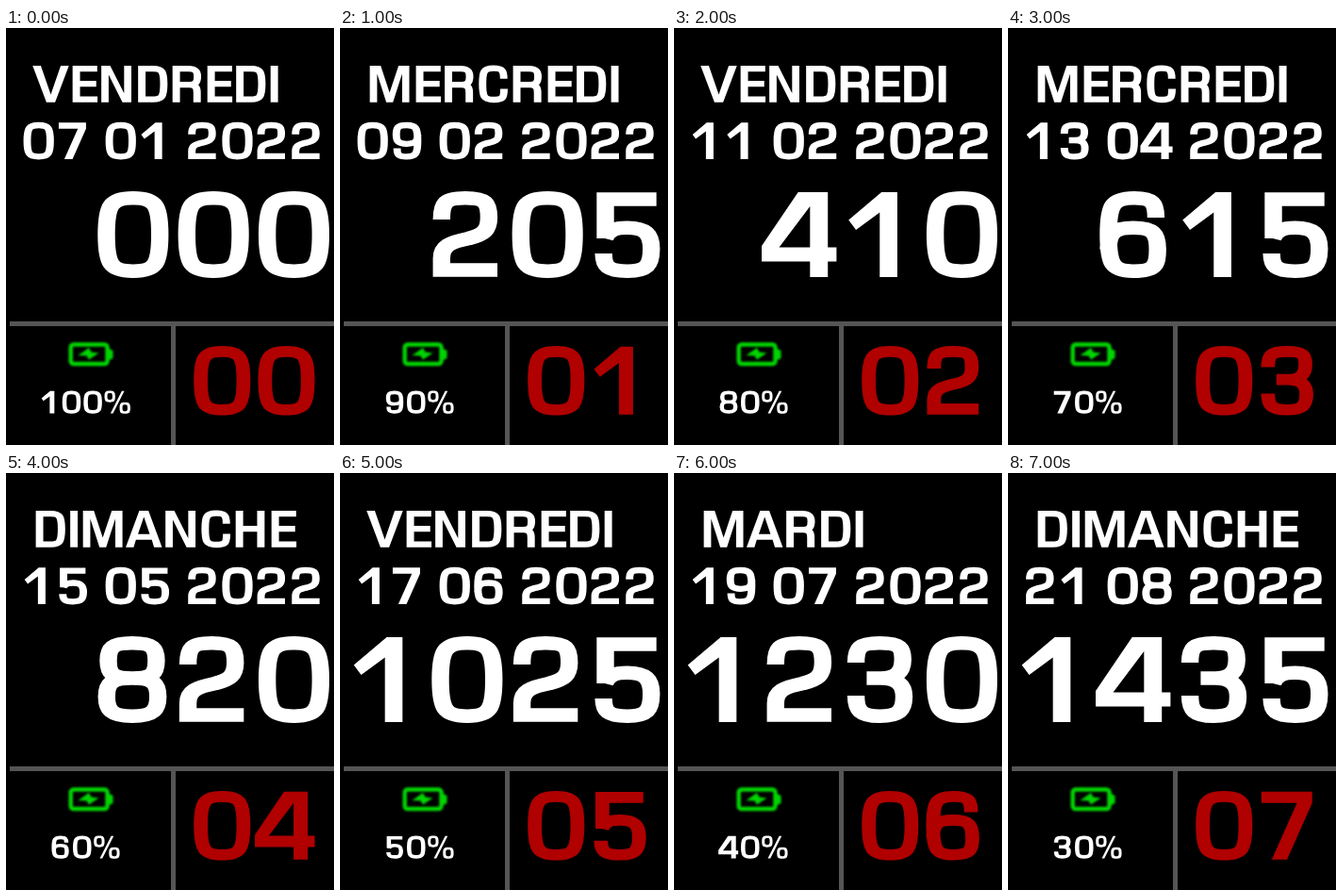
Write an HTML page that moves like this. It is 348 by 442 pixels and loops after 8000 ms.

```html
<!DOCTYPE html>
<html lang="fr">
<head>
<meta charset="utf-8">
<title>Compteur</title>
<style>
  html, body { margin: 0; width: 100%; height: 100%; overflow: hidden; background: #000; }
  svg { display: block; width: 348px; height: 442px; }
</style>
</head>
<body>
<svg viewBox="0 0 348 442">
  <rect width="348" height="442"/>
  <path d="M4 313.5H348M177.5 313V442" stroke="#555" stroke-width="5"/>
  <g style="filter:blur(.8px)" fill="#00d400">
    <rect x="68.7" y="335.5" width="38.8" height="20.5" rx="3" fill="none" stroke="#00d400" stroke-width="4.4"/>
    <path d="M108.5 339.5l5 2.5v8l-5 2.5z"/>
    <path d="M76.5 347L88 339 90.5 343.5 98.5 344.5 88 351.5 85.5 347.5Z"/>
  </g>
  <g id="labels"></g>
</svg>
<script>
const SVG = 'http://www.w3.org/2000/svg';
const STEP = 1000, STEPS = 8;
const WIDE = 1.26; // widens glyphs so upright stems are heavier than bars
const DIGIT = 67.7;
const ring = 'c-13 0-17 4-17 23s4 23 17 23 17-4 17-23-4-23-17-23zm0 10c-7 0-8 2-8 13s1 13 8 13 8-2 8-13-1-13-8-13z';

// Square display face: [advance, stroked path, filled path], cap height 90
const glyphs = {
  0: [DIGIT, 'M12 45C12 14 15.5 6.3 34.5 6.3S57 14 57 45 53.5 83.7 34.5 83.7 12 76 12 45Z'],
  1: [DIGIT, '', 'M34.5 0H47.8V90H33V21.5L13 40 6.8 29.5Z'],
  2: [DIGIT, 'M13 29C13 11 16 6.3 33 6.3S52.8 11 52.8 27C52.8 41 48 45 36 49C20 53 13 57 13 70V82.5H60'],
  3: [DIGIT, 'M13 27C13 11 16 6.3 33 6.3S52.4 11 52.4 24C52.4 38 46 43.5 34 43.5H22M34 43.5C48 44 53.4 50 53.4 63C53.4 78 49 83.7 33 83.7S13 78 13 62'],
  4: [DIGIT, '', 'M32 0H57V58.5H64.3V73.5H57V90H42V73.5H1.3V57ZM42 15L16 58.5H42Z'],
  5: [DIGIT, 'M58.5 7.5H15.5V49M15 49C18 40 24 37.7 34 37.7C49 37.7 54.2 44 54.2 60C54.2 78 50 83.7 34 83.7S14 79 14 65'],
  6: [DIGIT, 'M52 27C52 11 49 6.3 33.8 6.3C15 6.3 12 14 12 45S15 83.7 33 83.7 53.4 78 53.4 60.5 49 37.7 33 37.7 12 43 12 60.5'],
  7: [DIGIT, '', 'M6 0H59.5V15L33 90H17L43.5 15H6Z'],
  8: [DIGIT, 'M33.8 6.3C17 6.3 13.6 11 13.6 25S17 43.5 33.8 43.5 54 39 54 25 50.6 6.3 33.8 6.3ZM33.8 43.5C16 43.5 12.2 49 12.2 63S16 83.7 33.8 83.7 55.4 77 55.4 63 51.6 43.5 33.8 43.5Z'],
  9: [DIGIT, 'M14.5 63C14.5 79 17.5 83.7 32.7 83.7C51.5 83.7 54.8 76 54.8 45S51.5 6.3 33.5 6.3 13 12 13 29.5 17.5 52.3 33.5 52.3 54.8 47 54.8 29.5'],
  ' ': [25.3],
  '%': [90, '', `M21 -1${ring}M69 45${ring}M59 0h8L31 90h-8Z`],
  A: [71.1, '', 'M0 90L26.5 0H44.5L71 90H55.5L51 71.5H20L15.5 90ZM35.5 15L24 57.5H47Z'],
  C: [65.5, 'M54 32C54 12 51 6.3 34 6.3C15 6.3 12.5 14 12.5 45S15 83.7 34 83.7 54.5 78 54.5 57'],
  D: [67.4, 'M14 7.3H36C53.5 7.3 57 14 57 45S53.5 82.7 36 82.7H14Z'],
  E: [56.3, 'M55 7.3H14V82.7H55.5M14 44.5H53'],
  H: [70.1, 'M14 0V90M56 0V90M14 44.5H56'],
  I: [25, 'M14 0V90'],
  M: [90.4, '', 'M6.7 90V0H28L45.4 66 63 0H84V90H70V20L52 90H39L21 20V90Z'],
  N: [72, '', 'M6.7 90V0H24L51.3 68V0H65.5V90H48L21 22V90Z'],
  R: [68.3, 'M14 90V7.3H38C51 7.3 55.5 12 55.5 27S51 47 40 47H14M40 47C52 48 54.8 53 54.8 66V90'],
  V: [72, '', 'M.5 0H16.5L36 71 55.5 0H71.5L44.5 90H27.5Z']
};

const labels = document.getElementById('labels');

function add(parent, tag, attrs) {
  const el = document.createElementNS(SVG, tag);
  for (const key in attrs) el.setAttribute(key, attrs[key]);
  return parent.appendChild(el);
}

// align: 0 left, 0.5 centre, 1 right
function write(text, x, y, size, { align = 0, color = '#fff', weight = 14.6 } = {}) {
  const width = [...text].reduce((sum, c) => sum + glyphs[c][0], 0);
  const line = add(labels, 'g', {
    role: 'img', 'aria-label': text,
    transform: `translate(${x - align * width * size * WIDE} ${y}) scale(${size * WIDE} ${size})`
  });
  let pen = 0;
  for (const c of text) {
    const [advance, stroke, fill] = glyphs[c];
    const transform = `translate(${pen} 0)`;
    if (stroke) add(line, 'path', { d: stroke, transform, fill: 'none', stroke: color, 'stroke-width': weight });
    if (fill) add(line, 'path', { d: fill, transform, fill: color, 'fill-rule': 'evenodd' });
    pen += advance;
  }
}

const days = ['VENDREDI', 'MERCREDI', 'VENDREDI', 'MERCREDI', 'DIMANCHE', 'VENDREDI', 'MARDI', 'DIMANCHE'];
const months = [1, 2, 2, 4, 5, 6, 7, 8];
const pad = (n, length = 2) => String(n).padStart(length, '0');

function render(i) {
  labels.replaceChildren();
  write(days[i], 28, 40, 0.43);
  write(`${pad(7 + 2 * i)} ${pad(months[i])} 2022`, 16, 100.3, 0.43);
  write(pad(205 * i, 3), 347.3, 174, 1, { align: 1 });
  write(`${100 - 10 * i}%`, 84.3, 384.7, 0.265, { align: 0.5, weight: 13.5 });
  write(pad(i), 194.5, 337.8, 0.8, { color: '#b00000' });
}

const start = performance.now();
let shown = -1;
function tick() {
  const i = Math.floor((performance.now() - start) / STEP) % STEPS;
  if (i !== shown) render(shown = i);
  requestAnimationFrame(tick);
}
tick();
</script>
</body>
</html>
```
